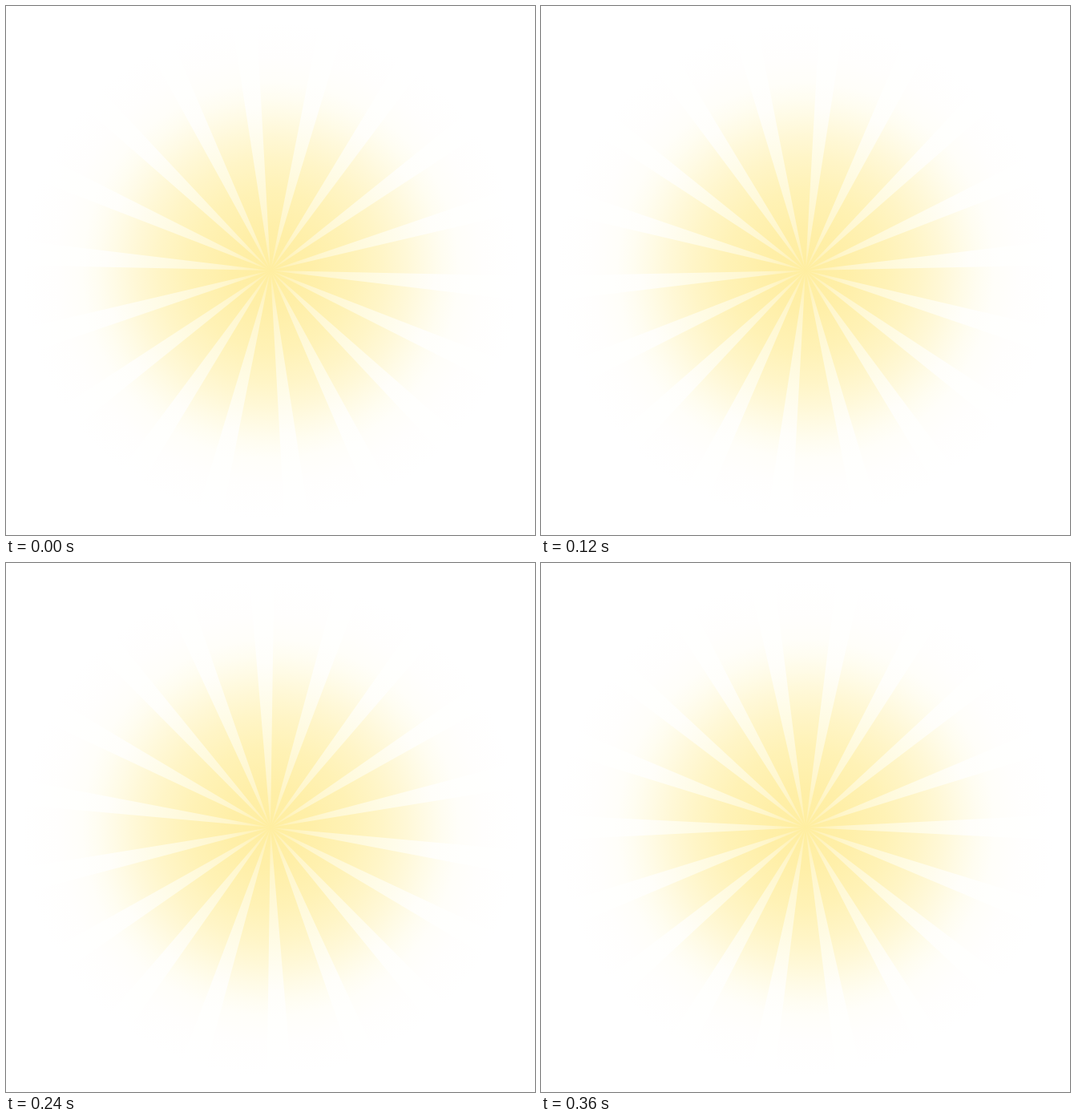
Recreate the animation shown at these times as an HTML page with a canvas. Size 660 px wide and 660 px high, loop 400 ms.

```html
<!DOCTYPE html>
<html lang="en">
<head>
<meta charset="utf-8">
<title>Sunburst</title>
<style>
  html, body { margin: 0; width: 100%; height: 100%; overflow: hidden; background: #fff; }
  canvas { display: block; width: 660px; height: 660px; }
</style>
</head>
<body>
<canvas id="stage" width="660" height="660"></canvas>
<script>
const ctx = document.getElementById('stage').getContext('2d');
const SIZE = 660, CENTER = SIZE / 2, REACH = 310;
const RAYS = 18, SPACING = 360 / RAYS, HALF_WIDTH = 7.2;
const STEP_MS = 40, STEP_DEG = 4, LOOP_STEPS = 10;
const rad = deg => deg * Math.PI / 180;

// Stops are [radius, color] pairs.
function radial(stops) {
  const gradient = ctx.createRadialGradient(0, 0, 0, 0, 0, REACH);
  for (const [radius, color] of stops) gradient.addColorStop(radius / REACH, color);
  return gradient;
}

const glow = radial([
  [0, '#ffeea2'], [18, '#fff2b8'], [50, '#fff6cb'], [100, '#fff9d9'],
  [150, '#fffce8'], [180, '#fffdf2'], [205, '#fffefa'], [240, '#fffffd'], [REACH, '#ffffff']
]);
const rayFill = radial([
  [0, '#ffeea0'], [50, '#ffefa8'], [100, '#fff2b6'], [140, '#fff5c7'],
  [170, '#fff8d7'], [195, '#fffbe6'], [215, '#fffdf1'], [235, '#fffef9'],
  [265, '#fffefd'], [REACH, '#ffffff']
]);

function draw(time) {
  const step = Math.floor(time / STEP_MS) % LOOP_STEPS;
  const turn = (step + 1) * STEP_DEG - 90;

  ctx.setTransform(1, 0, 0, 1, 0, 0);
  ctx.fillStyle = '#fff';
  ctx.fillRect(0, 0, SIZE, SIZE);
  ctx.translate(CENTER, CENTER);

  ctx.fillStyle = glow;
  ctx.beginPath();
  ctx.arc(0, 0, REACH, 0, 2 * Math.PI);
  ctx.fill();

  ctx.fillStyle = rayFill;
  ctx.beginPath();
  for (let i = 0; i < RAYS; i++) {
    const middle = turn + i * SPACING;
    ctx.moveTo(0, 0);
    ctx.arc(0, 0, REACH, rad(middle - HALF_WIDTH), rad(middle + HALF_WIDTH));
    ctx.closePath();
  }
  ctx.fill();
}

const start = performance.now();
function tick() {
  draw(performance.now() - start);
  requestAnimationFrame(tick);
}
tick();
</script>
</body>
</html>
```
